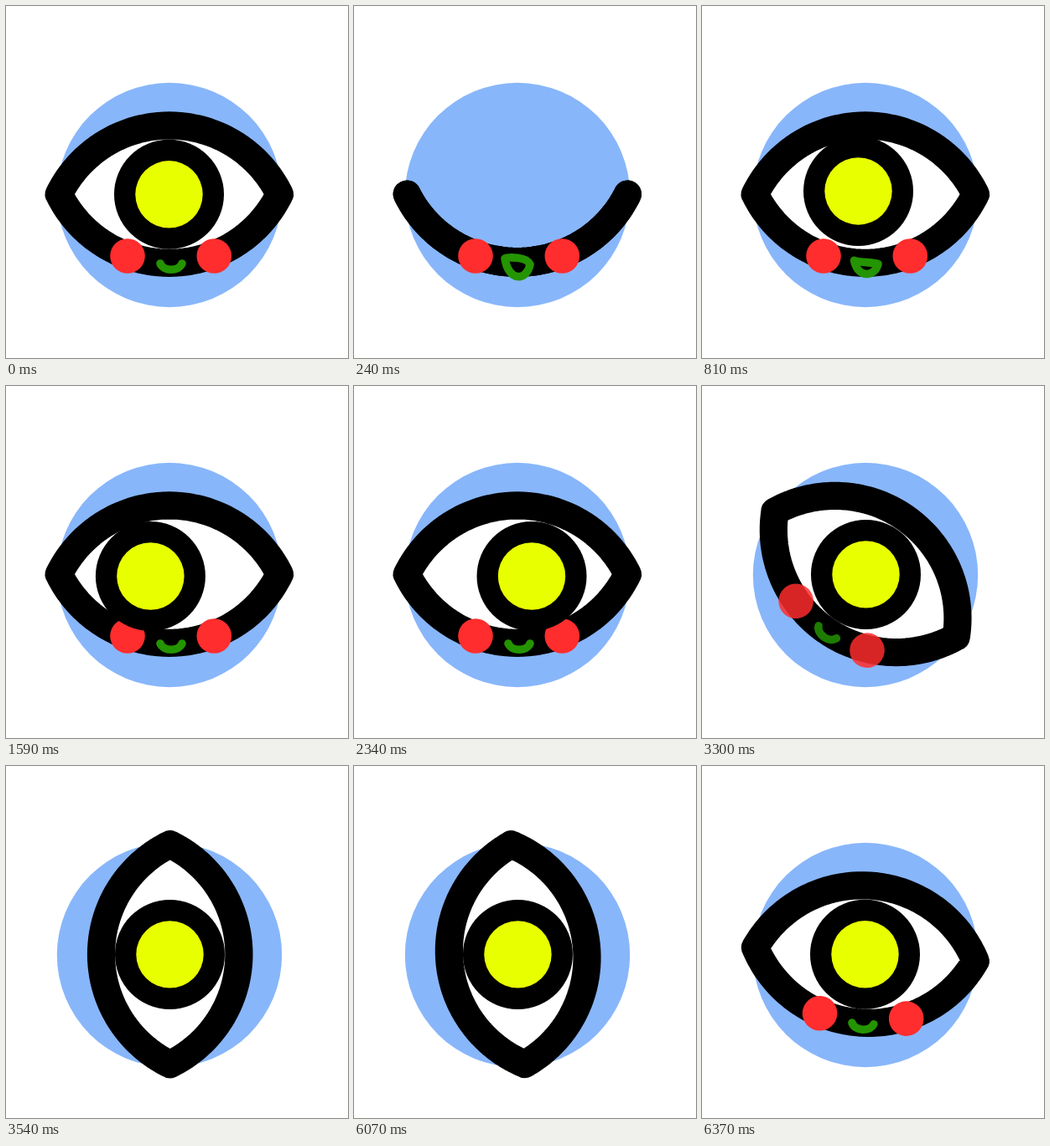
An HTML page with a canvas that plays this animation: 408 px wide and 421 px high, repeating every 6400 ms.

```html
<!DOCTYPE html>
<html lang="en">
<head>
<meta charset="utf-8">
<title>Eye</title>
<style>
html, body { margin: 0; width: 100%; height: 100%; overflow: hidden; background: #fff; }
canvas { display: block; width: 408px; height: 421px; }
</style>
</head>
<body>
<canvas id="stage" width="408" height="421"></canvas>
<script>
const ctx = document.getElementById('stage').getContext('2d');
const LOOP = 6400, STEP = 30;
const CX = 195.2, CY = 225.6;      // pivot of the turn
const OFF_X = -0.4, OFF_Y = -0.5;  // lens centre seen from the pivot
const HALF = 131.6, RADIUS = 146.4, DROP = 64.2, LINE = 33.2;

// start, duration, x, y of each glance
const START = [194.5, 225.3];
const GLANCES = [
  [720, 300, 161.5, 209.5],
  [1290, 300, 172.4, 227.5],
  [2100, 270, 214.5, 227.5],
  [2850, 310, 195.5, 225.4],
  [6040, 300, 194.5, 225.3]
];

const clamp = v => Math.max(0, Math.min(1, v));
const mix = (a, b, p) => a + (b - a) * p;
const span = (t, start, len) => clamp((t - start) / len);

function ease(p) {
  return p < 0.5 ? 0.5 * (2 * p) ** 1.42 : 1 - 0.5 * (2 - 2 * p) ** 1.42;
}

// rises and falls once within the given time
function pulse(t, start, len, power) {
  return Math.max(0, Math.sin(Math.PI * span(t, start, len))) ** power;
}

function gaze(t) {
  let [x, y] = START;
  for (const [start, len, gx, gy] of GLANCES) {
    const p = ease(span(t, start, len));
    x = mix(x, gx, p);
    y = mix(y, gy, p);
  }
  return [x, y];
}

function disc(x, y, r, color) {
  ctx.fillStyle = color;
  ctx.beginPath();
  ctx.arc(x, y, r, 0, Math.PI * 2);
  ctx.fill();
}

// lid 1 is open, -1 rests on the lower lid
function lens(lid) {
  const n = 64;
  const arc = x => Math.sqrt(RADIUS * RADIUS - x * x) - DROP;
  const path = new Path2D();
  for (let i = 0; i < 2 * n; i++) {
    const a = Math.PI * i / n;
    const x = -HALF * Math.cos(a);
    path.lineTo(CX + OFF_X + x, CY + OFF_Y + arc(x) * (i <= n ? -lid : 1));
  }
  path.closePath();
  return path;
}

function mouth(open) {
  const lx = 184 - 4 * open, ly = 308 - 6 * open;
  const rx = 210, ry = 308 + open;
  const top = 317.7 - 18 * open, low = 317.7 + 12 * open;
  ctx.beginPath();
  ctx.moveTo(lx, ly);
  ctx.bezierCurveTo(lx + 4, low, rx - 4, low, rx, ry);
  if (open > 0.01) {
    ctx.bezierCurveTo(rx - 4, top, lx + 4, top, lx, ly);
    ctx.closePath();
  }
  ctx.strokeStyle = '#249400';
  ctx.lineWidth = 9.6;
  ctx.lineCap = ctx.lineJoin = 'round';
  ctx.stroke();
}

function rim(path) {
  ctx.strokeStyle = '#000';
  ctx.lineWidth = LINE;
  ctx.lineJoin = 'round';
  ctx.stroke(path);
}

function face(open) {
  disc(145, 299, 20.8, '#ff2d2d');
  disc(248.3, 299, 20.8, '#ff2d2d');
  mouth(open);
}

function draw(t) {
  const turn = ease(span(t, 3150, 360)) - ease(span(t, 6040, 360));
  const blink = pulse(t, 0, 450, 2);
  const open = pulse(t, 0, 450, 1.4) + pulse(t, 720, 360, 1.4);
  const shut = blink > 0.001;
  const shape = lens(1 - 2 * blink);
  const [px, py] = gaze(t);

  ctx.fillStyle = '#fff';
  ctx.fillRect(0, 0, 408, 421);
  disc(195, 226, 134.2, '#88b6fa');

  ctx.save();
  ctx.translate(CX, CY);
  ctx.rotate(turn * Math.PI / 2);
  ctx.translate(-CX, -CY);
  ctx.fillStyle = '#fff';
  ctx.fill(shape);
  rim(shape);
  ctx.globalAlpha = clamp(2 - 3 * turn);
  if (!shut) face(open);
  ctx.restore();

  ctx.save();
  if (shut) ctx.clip(shape);
  disc(px, py, 65.5, '#000');
  disc(px, py, 40.2, '#e8ff00');
  ctx.restore();

  // the lids cover the pupil while blinking
  if (shut) {
    rim(shape);
    face(open);
  }
}

const begin = performance.now();

function tick(now) {
  const t = Math.max(0, now - begin) % LOOP;
  const shift = t < 6040 ? 0 : 10;
  draw(Math.floor((t - shift) / STEP) * STEP + shift);
  requestAnimationFrame(tick);
}

draw(0);
requestAnimationFrame(tick);
</script>
</body>
</html>
```
